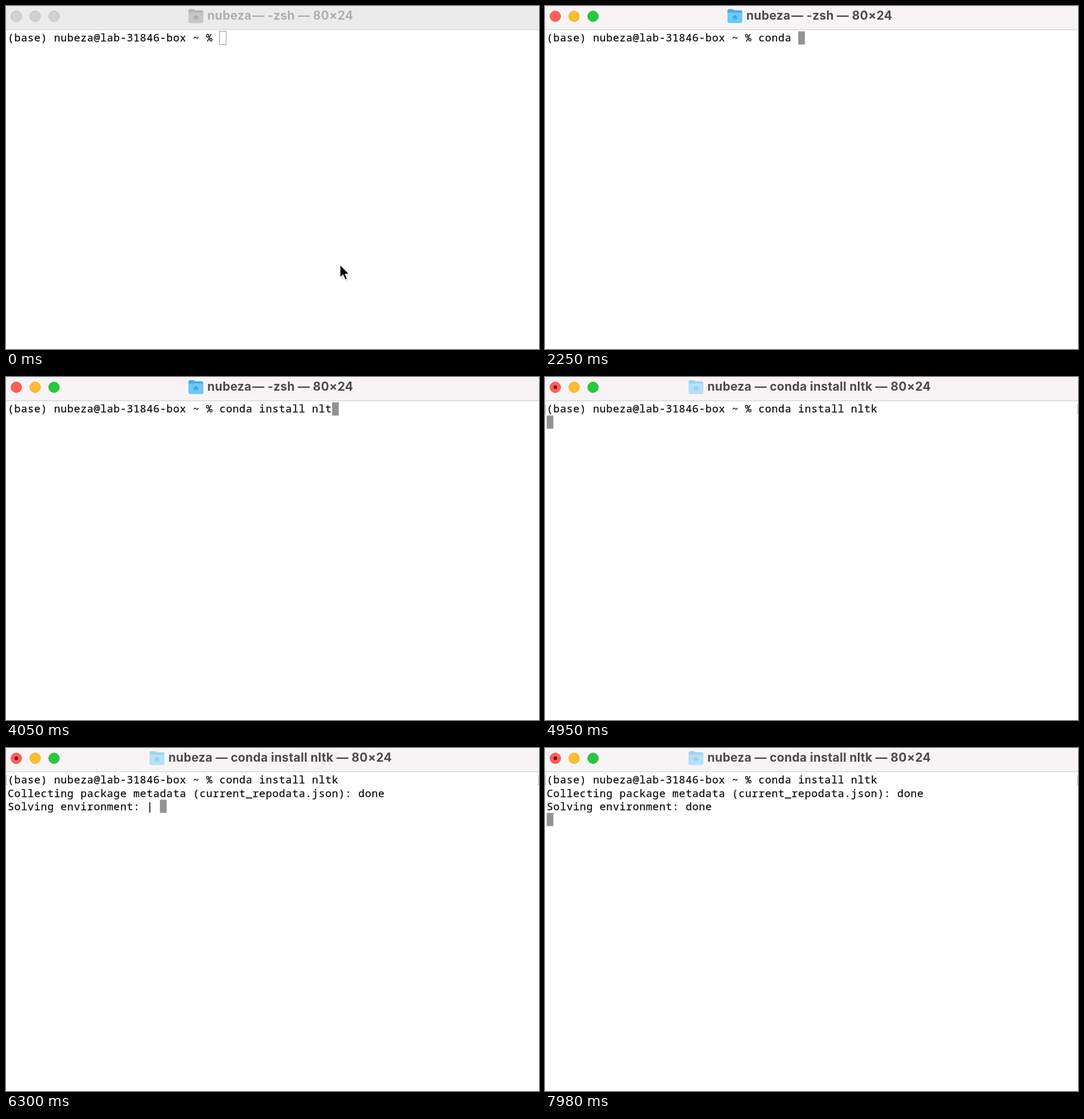
These frames come from a looping animation (932 by 601 pixels, 8 s). An HTML page:

```html
<!DOCTYPE html>
<html lang="en">
<head>
<meta charset="utf-8">
<title>Terminal</title>
<style>
  html, body { margin: 0; width: 100%; height: 100%; overflow: hidden; background: #fff; }
  svg { display: block; width: 932px; height: 601px; }
  #stage {
    --bar: #f8f4f6; --edge: #d3d0d1; --title: #4b494a;
    --red: #ff5f57; --yellow: #febc2e; --green: #28c840;
    --redRim: #ec5149; --yellowRim: #ecae27; --greenRim: #22b838;
    --back: #45aee4; --front: #6ec8f8; --home: #41a3dc;
  }
  #stage.inactive {
    --bar: #ebebeb; --edge: #d5d5d5; --title: #b0afaf;
    --red: #d1d1d1; --yellow: #d1d1d1; --green: #d1d1d1;
    --redRim: #bdbdbd; --yellowRim: #bdbdbd; --greenRim: #bdbdbd;
    --back: #b4b4b4; --front: #c6c6c6; --home: #adadad;
  }
  #stage.running { --back: #a0d3ee; --front: #b6e0f7; --home: #95cdec; }
  .title {
    font: 700 20.9px Inter, "Liberation Sans", sans-serif;
    letter-spacing: .33px; fill: var(--title);
  }
  .end { text-anchor: end; }
  .row {
    font: 500 18.2px "Noto Sans Mono", "DejaVu Sans Mono", monospace;
    letter-spacing: .655px; white-space: pre;
    fill: #0c0c0c; stroke: #0c0c0c; stroke-width: .25px;
  }
  #caret { fill: #929292; stroke: none; }
  .inactive #caret { fill: #fff; stroke: #929292; }
  .busy { visibility: hidden; }
  .running .busy { visibility: visible; }
</style>
</head>
<body>
<svg id="stage" class="inactive" viewBox="0 0 932 601">
  <rect width="932" height="601" fill="#fff"/>
  <rect width="932" height="41" fill="var(--bar)"/>
  <rect y="41" width="932" height="1.3" fill="var(--edge)"/>

  <circle cx="18" cy="18" r="9.300" fill="var(--red)" stroke="var(--redRim)"/>
  <circle cx="51" cy="18" r="9.300" fill="var(--yellow)" stroke="var(--yellowRim)"/>
  <circle cx="84" cy="18" r="9.300" fill="var(--green)" stroke="var(--greenRim)"/>
  <circle class="busy" cx="18" cy="18" r="3.200" fill="#7c0c08"/>

  <g id="folder">
    <path d="M0 3q0-3 3-3h5q2 0 3 1.200l1 .8h11q3 0 3 3v16q0 3-3 3H3q-3 0-3-3z" fill="var(--back)"/>
    <path d="M0 6h26v15q0 3-3 3H3q-3 0-3-3z" fill="var(--front)"/>
    <path d="M13 10l4.700 4h-1.200v4h-7v-4H8.300z" fill="var(--home)"/>
    <path d="M12.200 15.200h1.600v2.800h-1.600z" fill="var(--front)"/>
  </g>
  <text class="title" id="user" y="24.300">nubeza</text>
  <text class="title end" id="task" y="24.300"></text>

  <rect id="caret" width="11.600" height="23.100"/>
  <g id="rows"></g>
  <path class="busy" d="M2 48.500H.5v16H2M930 48.500h1.500v16H930" fill="none" stroke="#b4b4b4"/>

  <g id="arrow" transform="translate(584 453)">
    <path d="M1 2v23.500l5.400-4.800 3.600 8.300 4.200-1.800-3.600-8.100h7.400z" fill="#000" opacity=".16"/>
    <path d="M0 0v23.300l5.300-4.800 3.700 8.400 4-1.800-3.700-8.100h7.200z"
      fill="#000" stroke="#fff" stroke-width="1.500"/>
  </g>
  <path id="beam" d="M-6-13h2q4 0 4 4V9q0 4-4 4h-2M6-13H4q-4 0-4 4M6 13H4q-4 0-4-4M-3.500 2h7"
    fill="none" stroke="#222" stroke-width="1.900"/>
</svg>
<script>
  const LOOP = 8000, COL = 11.575, ROW = 23.1, LEFT = 3, TOP = 44.4;
  const FOCUS = 540, ENTER = 4410, RETITLE = 4500, COLLECT = 5820, SOLVE = 6180, SOLVED = 7770;
  const PROMPT = '(base) nubeza@lab-31846-box ~ % ';
  const COMMAND = 'conda install nltk';
  const KEYS = [1230, 1440, 1620, 1860, 2040, 2220, 2310, 2430, 2550,
    2700, 2790, 3000, 3120, 3240, 3420, 3630, 4020, 4200];

  const get = id => document.getElementById(id);
  const [stage, folder, user, task, caret, arrow, beam] =
    ['stage', 'folder', 'user', 'task', 'caret', 'arrow', 'beam'].map(get);
  const show = (el, on) => el.setAttribute('visibility', on ? 'visible' : 'hidden');
  const move = (el, x, y) => el.setAttribute('transform', `translate(${x} ${y})`);
  const write = (el, text) => { if (el.textContent !== text) el.textContent = text; };

  const rows = Array.from({ length: 3 }, (_, i) => {
    const row = document.createElementNS(stage.namespaceURI, 'text');
    row.setAttribute('class', 'row');
    row.setAttribute('x', LEFT);
    row.setAttribute('y', 62.4 + i * ROW);
    return get('rows').appendChild(row);
  });

  // Terminal contents; the caret sits at the end of the last line.
  function linesAt(t) {
    const spin = '/-\\|'[Math.floor((t - 5540) / 100) & 3] + ' ';
    const lines = [PROMPT + COMMAND.slice(0, KEYS.filter(k => k <= t).length)];
    if (t >= ENTER) lines.push('');
    if (t >= COLLECT) {
      lines[1] = 'Collecting package metadata (current_repodata.json): ' + (t < SOLVE ? spin : 'done');
    }
    if (t >= SOLVE) lines.push('Solving environment: ' + (t < SOLVED ? spin : 'done'));
    if (t >= SOLVED) lines.push('');
    return lines;
  }

  function draw(t) {
    const running = t >= RETITLE;
    stage.setAttribute('class', t < FOCUS ? 'inactive' : running ? 'running' : '');

    const start = running ? 284 : 352;
    move(folder, start - 33, 5.5);
    user.setAttribute('x', start);
    task.setAttribute('x', running ? 674.8 : 607.3);
    write(task, `— ${running ? COMMAND : '-zsh'} — 80×24`);

    const lines = linesAt(t), last = lines.length - 1;
    rows.forEach((row, i) => write(row, lines[i] || ''));
    caret.setAttribute('x', LEFT + lines[last].length * COL);
    caret.setAttribute('y', TOP + last * ROW);

    const p = Math.min(1, Math.max(0, (t - FOCUS) / 180));
    const glide = p * (2 - p);
    show(arrow, t < FOCUS);
    show(beam, t >= FOCUS && t < KEYS[0]);
    move(beam, 584 + 2 * glide, 454 - 16 * glide);
  }

  const begin = performance.now();
  function tick() {
    draw((performance.now() - begin) % LOOP);
    requestAnimationFrame(tick);
  }
  draw(0);
  requestAnimationFrame(tick);
</script>
</body>
</html>
```
